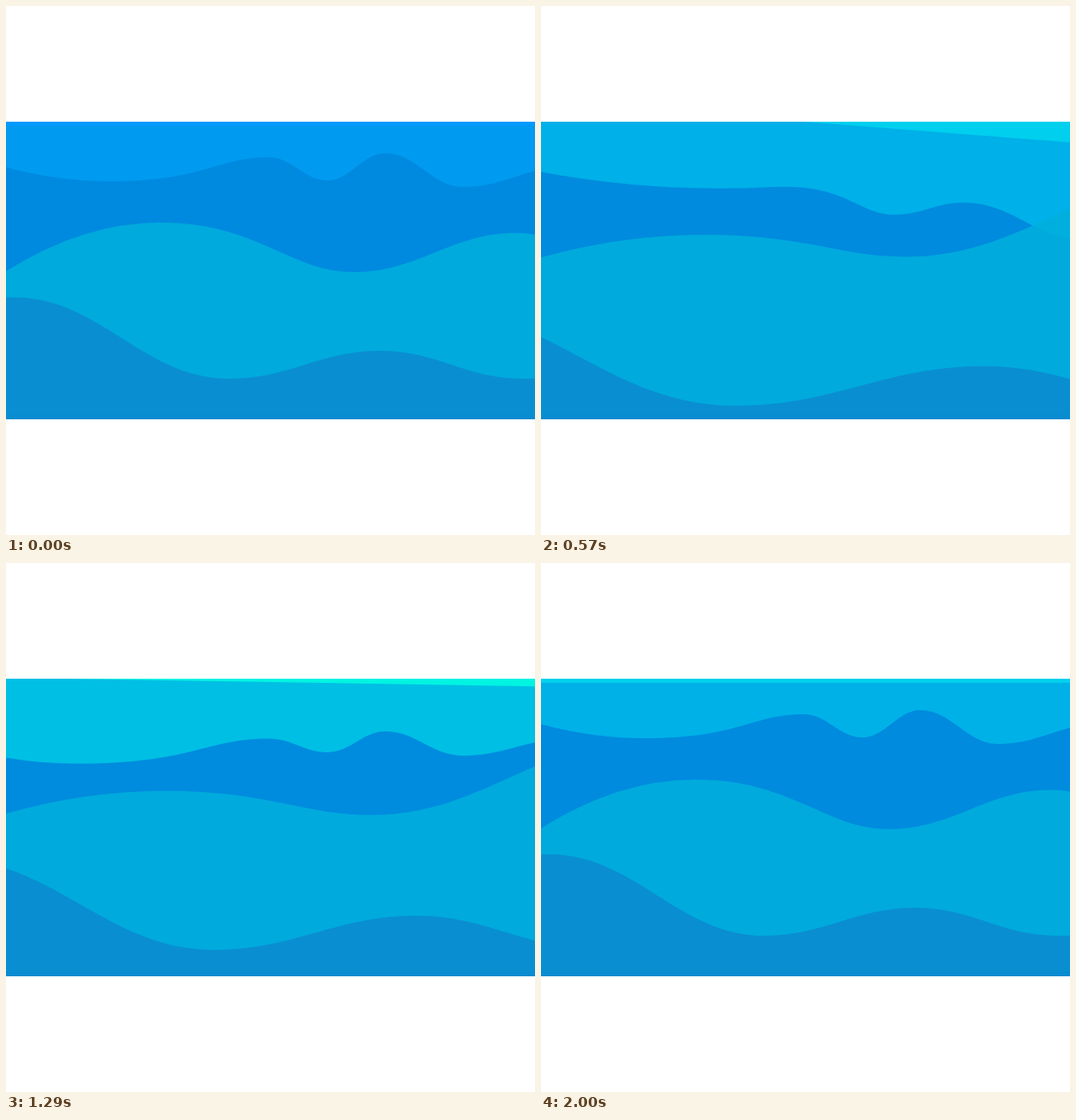
Write an HTML page with a canvas that moves like this. It is 640x640 px and loops after 2.07 s.

```html
<!DOCTYPE html>
<html lang="en">
<head>
<meta charset="utf-8">
<title>Waves</title>
<style>
  html, body { margin: 0; width: 100%; height: 100%; overflow: hidden; background: #fff; }
  canvas { display: block; width: 640px; height: 640px; }
</style>
</head>
<body>
<canvas id="stage" width="640" height="640"></canvas>
<script>
const ctx = document.getElementById('stage').getContext('2d');
const LOOP = 2070, FPS = 14, LAST = 28;
const TOP = 140, BOTTOM = 500, WIDTH = 640;

const mix = (a, b, p) => a + (b - a) * p;
const ease = u => u * u * (3 - 2 * u);
const ramp = (k, from, to) => Math.min(1, Math.max(0, (k - from) / (to - from)));

// Eases from 0 up to 1 at the top and back to 0; times are in steps.
const surge = (k, start, top, end) =>
  k < top ? ease(ramp(k, start, top)) : ease(ramp(k, end, top));

// Fills below a curve through crests and troughs: [x, y, handle out, handle in].
function wave(color, startX, startY, nodes) {
  let [x, y] = nodes[0];
  ctx.beginPath();
  ctx.moveTo(startX, startY);
  ctx.quadraticCurveTo((startX + x) / 2, y, x, y);
  for (const [nx, ny, out = .4, into = .4] of nodes.slice(1)) {
    const dx = nx - x;
    ctx.bezierCurveTo(x + dx * out, y, nx - dx * into, ny, nx, ny);
    [x, y] = [nx, ny];
  }
  ctx.lineTo(x, BOTTOM);
  ctx.lineTo(startX, BOTTOM);
  ctx.fillStyle = color;
  ctx.fill();
}

function drawSky(k) {
  const glow = k < 15 ? k / 15 : 1 - (k - 15) / 28;
  const tilt = surge(k, 0, 12, 20);
  ctx.fillStyle = `rgb(0, ${mix(153, 255, glow)}, ${mix(255, 221, glow)})`;
  ctx.fillRect(0, TOP, WIDTH, BOTTOM - TOP);
  ctx.beginPath();
  ctx.moveTo(0, 145 - 40 * tilt);
  ctx.lineTo(WIDTH, 145 + 27 * tilt);
  ctx.lineTo(WIDTH, BOTTOM);
  ctx.lineTo(0, BOTTOM);
  ctx.fillStyle = 'rgba(0, 157, 230, .6)';
  ctx.fill();
}

function drawRidge(k) {
  const sink = surge(k, 0, 5.5, 28);   // the whole ridge drops
  const slide = surge(k, 0, 5, 16);    // its right side stretches outward
  const kick = surge(k, 0, 4, 8);      // a short first push
  const roll = surge(k, 10, 18, 28);   // a late swell on the left
  const endX = 553 + 132 * slide + 34 * kick;
  wave('rgba(0, 137, 222, .93)', 0, 195 + 6 * sink + 22 * kick + 38 * roll, [
    [125 + 93 * sink - 66 * kick - 78 * roll, 212 + 9 * sink + 8 * kick + 27 * roll],
    [318 - 27 * slide + 6 * kick, 183 + 37 * sink + 7 * kick + 14 * roll, .6, .33],
    [389 + 48 * slide, 211 + 43 * sink, .4 + .2 * slide, .4 - .1 * slide],
    [459 + 64 * slide + 8 * kick, 178 + 62 * sink],
    [endX, 219 + 34 * sink + 40 * slide],
    [endX + 127, 194 + 45 * sink + 52 * slide],
    [endX + 277, 194 + 45 * sink + 52 * slide]
  ]);
}

function drawMiddle(k) {
  const p = surge(k, 0, 12, 28);
  const sway = 4 * p * (1 - p);
  const endX = 617 + 233 * p, endY = 274.5 - 88 * p;
  wave('rgba(0, 175, 221, .87)', 0, 321 - 7 * p - 15 * sway, [
    [187 + 45 * p - 29 * sway, 262 + 20 * p],
    [421 + 16 * p + 12 * sway, 322 - 25 * p, .5, .33],
    [endX, endY],
    [endX + 150, endY + 40]
  ]);
}

function drawDeep(k) {
  const p = surge(k, 0, 8.5, 28);
  const crestY = 352.5 + 9.5 * p;
  const endX = 625 + 165 * p, endY = 451 + 29 * p;
  wave('rgb(10, 142, 210)', -200, crestY, [
    [10 - 160 * p, crestY],
    [270 - 35 * p, 451 + 33 * p],
    [453 + 84 * p, 417 + 19 * p],
    [endX, endY],
    [endX + 150, endY - 25]
  ]);
}

function draw(k) {
  ctx.clearRect(0, 0, 640, 640);
  ctx.save();
  ctx.beginPath();
  ctx.rect(0, TOP, WIDTH, BOTTOM - TOP);
  ctx.clip();
  drawSky(k);
  drawRidge(k);
  drawMiddle(k);
  drawDeep(k);
  ctx.fillStyle = 'rgb(9, 139, 208)';
  ctx.fillRect(0, BOTTOM - 5, WIDTH, 5);
  ctx.restore();
}

function tick() {
  const t = performance.now() % LOOP;
  draw(Math.min(LAST, Math.floor((t + 5) * FPS / 1000)));
  requestAnimationFrame(tick);
}
tick();
</script>
</body>
</html>
```
